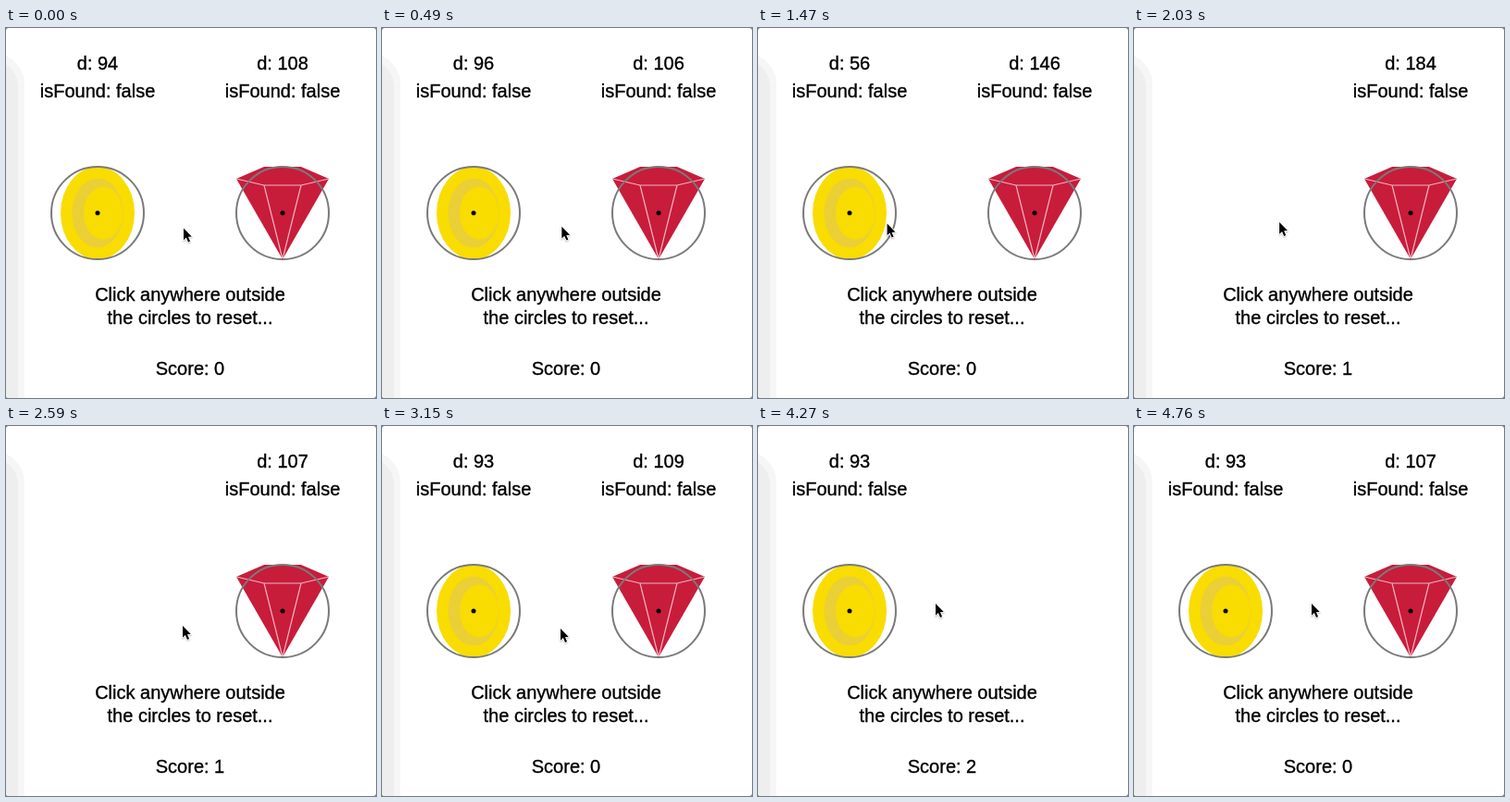
Write an HTML page with a canvas that moves like this. It is 400x400 px and loops after 6510 ms.

```html
<!DOCTYPE html>
<html lang="en">
<head>
<meta charset="utf-8">
<title>Find the treasure</title>
<style>
html, body { margin: 0; width: 100%; height: 100%; overflow: hidden; background: #fff; }
canvas { display: block; }
</style>
</head>
<body>
<canvas id="stage" width="400" height="400"></canvas>
<script>
const ctx = document.getElementById('stage').getContext('2d');
const LOOP = 6510, STEP = 70;
const LAG = 56; // the readout trails the pointer
const CLICK_TIME = 140;
const clicks = [630, 2800, 4620];

const home = { x: 192, y: 216.5 };
const moves = [
  { from: 56, to: 70, x: 193, y: 216 },
  { from: 330, to: 570, x: 195, y: 214 },
  { from: 1246, to: 1610, x: 105, y: 210 },
  { from: 1964, to: 2380, x: 192, y: 210, power: 5.3 },
  { from: 2576, to: 2590, x: 191, y: 216 },
  { from: 3136, to: 3150, x: 193, y: 219 },
  { from: 3150, to: 3720, x: 278, y: 189, power: 1.125 },
  { from: 3860, to: 4210, x: 192, y: 192, power: 1.5 }
];

const ITEM_Y = 200;
const items = [
  { x: 99, found: [1540, 2800], points: 1, draw: drawCoin },
  { x: 299, found: [3570, 4690], points: 2, draw: drawGem }
];

function pointerAt(t) {
  let { x, y } = home;
  for (const move of moves) {
    const k = Math.min(1, Math.max(0, (t - move.from) / (move.to - move.from)));
    const eased = 1 - (1 - k) ** (move.power || 1);
    x += (move.x - x) * eased;
    y += (move.y - y) * eased;
  }
  return { x, y };
}

function ellipse(x, y, rx, ry, fill) {
  ctx.beginPath();
  ctx.ellipse(x, y, rx, ry, 0, 0, Math.PI * 2);
  if (fill) {
    ctx.fillStyle = fill;
    ctx.fill();
  }
}

function ring(x, y, r, color) {
  ellipse(x, y, r, r);
  ctx.strokeStyle = color;
  ctx.lineWidth = 2;
  ctx.stroke();
}

function trace(...points) {
  ctx.beginPath();
  points.forEach(([x, y]) => ctx.lineTo(x, y));
}

function panel(x, y, w, h, r, fill) {
  ctx.beginPath();
  ctx.roundRect(x, y, w, h, r);
  ctx.fillStyle = fill;
  ctx.fill();
}

function text(str, x, y) {
  ctx.fillStyle = ctx.strokeStyle = '#000';
  ctx.lineWidth = 0.35;
  ctx.fillText(str, x, y);
  ctx.strokeText(str, x, y);
}

function drawCoin() {
  ellipse(0, 0, 40, 50, '#f9dc00');
  ellipse(0, 0, 27.5, 37.5, '#ebcf36');
  ellipse(6, 0, 21, 28.5, '#f9dc00');
}

function drawGem() {
  const left = [-50, -37], right = [50, -37], tip = [0, 50];
  const a = [-20, -30], b = [20, -30];
  trace([-20, -50], [20, -50], right, tip, left);
  ctx.fillStyle = '#c81c3b';
  ctx.fill();
  ctx.strokeStyle = '#f3b3c0';
  ctx.lineWidth = 1.2;
  trace(left, a, b, right);
  ctx.stroke();
  trace(a, tip, b);
  ctx.stroke();
}

function drawItem(item, pointer) {
  const d = Math.round(Math.hypot(pointer.x - item.x, pointer.y - ITEM_Y));
  text('d: ' + d, item.x, 45);
  text('isFound: false', item.x, 75);
  ctx.save();
  ctx.translate(item.x, ITEM_Y);
  item.draw();
  ring(0, 0, 50, '#7a7a7a');
  ellipse(0, 0, 2.5, 2.5, '#000');
  ctx.restore();
}

function drawPointer({ x, y }) {
  ctx.save();
  ctx.translate(x, y);
  ctx.scale(0.9, 0.9);
  trace([0, 0], [0, 14.2], [3.2, 11.2], [5.6, 16.6], [7.8, 15.6], [5.5, 10.4], [9.8, 10]);
  ctx.closePath();
  ctx.lineJoin = 'round';
  ctx.lineWidth = 2;
  ctx.strokeStyle = '#fff';
  ctx.shadowColor = 'rgba(0,0,0,.25)';
  ctx.shadowBlur = 1.5;
  ctx.shadowOffsetY = 1;
  ctx.stroke();
  ctx.shadowColor = 'transparent';
  ctx.fillStyle = '#000';
  ctx.fill();
  ctx.restore();
}

function drawWindow() {
  ctx.fillStyle = '#777';
  ctx.fillRect(0, 0, 400, 400);
  panel(0, 0, 400, 400, 3, '#fff');
  ctx.save();
  ctx.clip();
  panel(-80, 27, 100, 450, 34, '#f6f6f6');
  panel(-80, 35, 93, 450, 28, '#eeeeee');
  ctx.restore();
}

function render(now) {
  const t = Math.floor((now % LOOP) / STEP) * STEP;
  const isFound = ({ found: [from, to] }) => t >= from && t < to;
  const pointer = pointerAt(t), sampled = pointerAt(t - LAG);

  drawWindow();
  ctx.font = '20px "Liberation Sans", Arial, Helvetica, sans-serif';
  ctx.textAlign = 'center';
  items.filter(item => !isFound(item)).forEach(item => drawItem(item, sampled));

  const score = items.filter(isFound).reduce((sum, item) => sum + item.points, 0);
  text('Click anywhere outside', 199, 295);
  text('the circles to reset...', 199, 320);
  text('Score: ' + score, 199, 375);

  if (clicks.some(c => t >= c && t < c + CLICK_TIME)) ring(pointer.x, pointer.y, 22, '#222');
  drawPointer(pointer);
}

const start = performance.now();
(function loop() {
  render(performance.now() - start);
  requestAnimationFrame(loop);
})();
</script>
</body>
</html>
```
